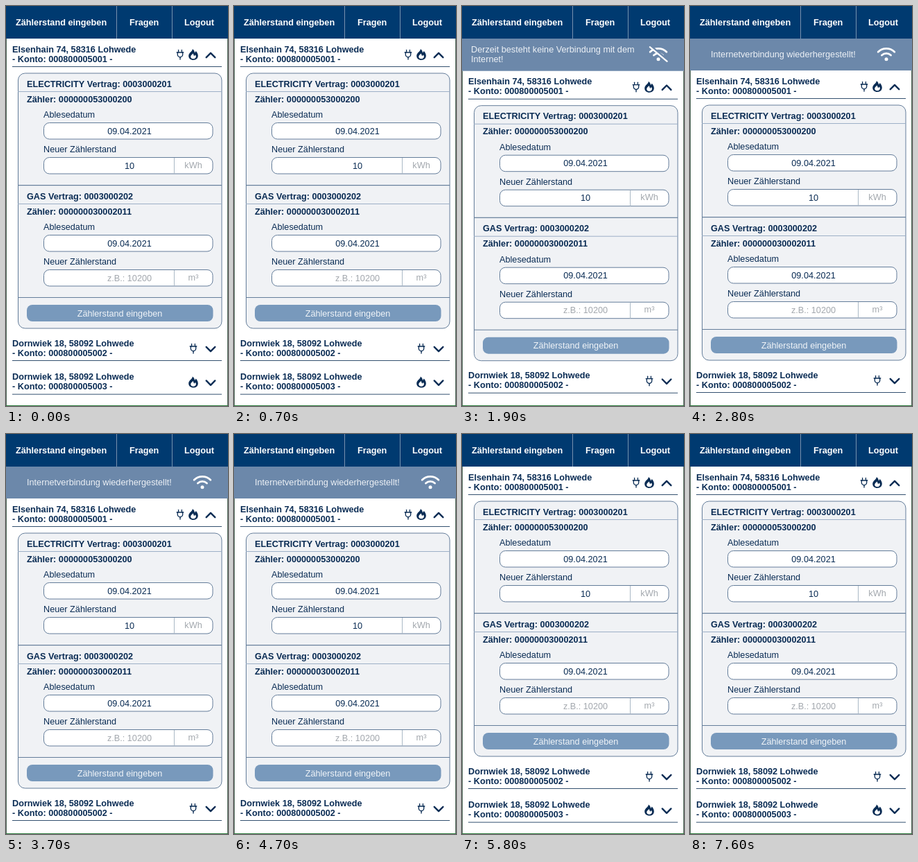
An HTML page with a canvas that plays this animation: 320x577 px, repeating every 7.7 s.

```html
<!DOCTYPE html>
<html lang="de">
<head>
<meta charset="utf-8">
<title>Zählerstand eingeben</title>
<style>
html, body { margin: 0; width: 100%; height: 100%; overflow: hidden; background: #fff; }
canvas { display: block; width: 100vw; height: 100vh; }
</style>
</head>
<body>
<canvas id="stage"></canvas>
<script>
const W = 320, H = 577, LOOP = 7700;
const OFFLINE_AT = 800, ONLINE_AT = 2800, CLOSE_AT = 5800;
const NAVY = '#003a70', INK = '#0a2c54', BORDER = '#647d9a';
const BANNER = '#6c88aa', PALE = '#f0f2f5', HINT = '#a3a8ae';
const canvas = document.getElementById('stage');
const ctx = canvas.getContext('2d');
const dpr = window.devicePixelRatio || 1;
canvas.width = W * dpr;
canvas.height = H * dpr;

// Text is placed by the middle of its capital letters.
function text(str, x, y, color = INK, bold = false, align = 'left') {
  ctx.font = (bold ? 'bold ' : '') + '12.7px "Liberation Sans", Arial, sans-serif';
  ctx.textAlign = align;
  ctx.fillStyle = color;
  ctx.fillText(str, x, y + 4.5);
}

function rect(x, y, w, h, color) {
  ctx.fillStyle = color;
  ctx.fillRect(x, y, w, h);
}

function box(x, y, w, h, r, fill, stroke) {
  ctx.beginPath();
  ctx.roundRect(x, y, w, h, r);
  ctx.fillStyle = fill;
  ctx.fill();
  if (stroke) {
    ctx.strokeStyle = stroke;
    ctx.lineWidth = 1;
    ctx.stroke();
  }
}

function polyline(points, width, color) {
  ctx.beginPath();
  points.forEach(([x, y]) => ctx.lineTo(x, y));
  ctx.strokeStyle = color;
  ctx.lineWidth = width;
  ctx.stroke();
}

function icon(x, y, draw) {
  ctx.save();
  ctx.translate(x, y);
  ctx.lineCap = ctx.lineJoin = 'round';
  draw();
  ctx.restore();
}

function plug() {
  for (const x of [-2.4, 2.4]) polyline([[x, -6.5], [x, -3.4]], 1.3, INK);
  polyline([[-4.8, -3], [4.8, -3]], 1.3, INK);
  ctx.beginPath();
  ctx.moveTo(-3.7, -3);
  ctx.lineTo(-3.7, 0);
  ctx.arc(0, 0, 3.7, Math.PI, 0, true);
  ctx.lineTo(3.7, -3);
  ctx.stroke();
  polyline([[0, 4], [0, 7]], 1.4, INK);
}

function flame() {
  ctx.fillStyle = INK;
  ctx.fill(new Path2D('M-1.2-8C-.8-4.6-6.8-2.8-6.8 2C-6.8 5.8-3.7 8 0 8C3.8 8 6.8 5.6 6.8 1.8C6.8-1 5.2-3.4 3.6-5C3.3-4 2.8-3.2 2-2.6C1.8-4.8.6-6.8-1.2-8Z'));
  ctx.fillStyle = '#fff';
  ctx.fill(new Path2D('M-.4-1.6C-2.2.2-3.8 1.3-3.8 3.2C-3.8 5.2-2 6.2 0 6.2C2.2 6.2 3.9 5 3.9 3C3.9 2 3.5 1 2.9.4L1.2 2.2Z'));
}

function wifi(off) {
  const color = '#fff';
  ctx.strokeStyle = ctx.fillStyle = color;
  ctx.lineWidth = 2.8;
  for (const [r, half] of [[16.8, .78], [9.7, .74]]) {
    ctx.beginPath();
    ctx.arc(0, 8.6, r, -Math.PI / 2 - half, -Math.PI / 2 + half);
    ctx.stroke();
  }
  ctx.beginPath();
  ctx.arc(0, 7.2, 2.5, 0, 7);
  ctx.fill();
  if (off) {
    polyline([[-11, -11.6], [13.4, 8]], 3, BANNER);
    polyline([[-12.2, -10.4], [12.6, 10.4]], 2.2, color);
  }
}

function account(y, street, number, icons, open) {
  text(street, 9, y, INK, true);
  text('- Konto: ' + number + ' -', 9, y + 14.2, INK, true);
  icons.forEach((draw, i) => icon(270 - 19 * (icons.length - 1 - i), y + 8, draw));
  const dir = open ? -1 : 1;
  icon(295, y + 9, () => polyline([[-6.3, -3.2 * dir], [0, 3.2 * dir], [6.3, -3.2 * dir]], 2.4, INK));
  rect(9, y + 25, 302, 1, '#33506f');
}

function field(y, label, value, color, unit) {
  text(label, 54, y - 23.5);
  box(54.5, y - 11.5, 243.5, 23.5, 8, '#fff', BORDER);
  text(value, 178, y, color, false, 'center');
  if (unit) {
    rect(242, y - 11, 1, 23, '#aab8c6');
    text(unit, 270, y - 1, HINT, false, 'center');
  }
}

function meter(y, contract, number, reading, color, unit) {
  text(contract, 30, y, INK, true);
  rect(17, y + 11, 294, 1, '#9db0c7');
  text('Zähler: ' + number, 30, y + 22, INK, true);
  field(y + 68, 'Ablesedatum', '09.04.2021', INK);
  field(y + 118, 'Neuer Zählerstand', reading, color, unit);
}

function page() {
  account(62, 'Elsenhain 74, 58316 Lohwede', '000800005001', [plug, flame], true);
  box(17.5, 97, 293.5, 368, 10, PALE, BORDER);
  meter(112, 'ELECTRICITY Vertrag: 0003000201', '000000053000200', '10', INK, 'kWh');
  rect(17, 258, 294, 1.2, BORDER);
  meter(274, 'GAS Vertrag: 0003000202', '000000030002011', 'z.B.: 10200', HINT, 'm³');
  rect(17, 420, 294, 1, BORDER);
  box(30, 431, 268.5, 24, 8, '#7899bc');
  text('Zählerstand eingeben', 164, 443, '#f0f4f8', false, 'center');
  account(486, 'Dornwiek 18, 58092 Lohwede', '000800005002', [plug], false);
  account(534.6, 'Dornwiek 18, 58092 Lohwede', '000800005003', [flame], false);
}

function nav() {
  rect(0, 0, W, 47, NAVY);
  for (const x of [159, 239]) rect(x, 0, 1, 47, '#7890ad');
  text('Zählerstand eingeben', 14, 23, '#fff', true);
  text('Fragen', 178, 23, '#fff', true);
  text('Logout', 257, 23, '#fff', true);
}

function banner(off, height) {
  rect(0, 47, W, height, BANNER);
  if (off) {
    text('Derzeit besteht keine Verbindung mit dem', 13, 62, '#edf1f6');
    text('Internet!', 13, 76.5, '#edf1f6');
  } else {
    text('Internetverbindung wiederhergestellt!', 30, 69.5, '#edf1f6');
  }
  icon(283, 69.5, () => wifi(off));
}

function draw(t) {
  const shown = t >= OFFLINE_AT && t < CLOSE_AT;
  const off = t < ONLINE_AT;
  const shift = !shown ? 0 : off ? 46.7 : 46;
  ctx.setTransform(dpr, 0, 0, dpr, 0, 0);
  rect(0, 0, W, H, '#fff');
  ctx.save();
  ctx.translate(0, shift);
  page();
  ctx.restore();
  nav();
  if (shown) banner(off, shift);
  rect(0, 47 + shift, 1, H, '#4c6656');
  rect(W - 1, 47 + shift, 1, H, '#4c6656');
  rect(0, H - 1, W, 1, '#2c7a3c');
}

const start = performance.now();
function tick() {
  draw((performance.now() - start) % LOOP);
  requestAnimationFrame(tick);
}
tick();
</script>
</body>
</html>
```
